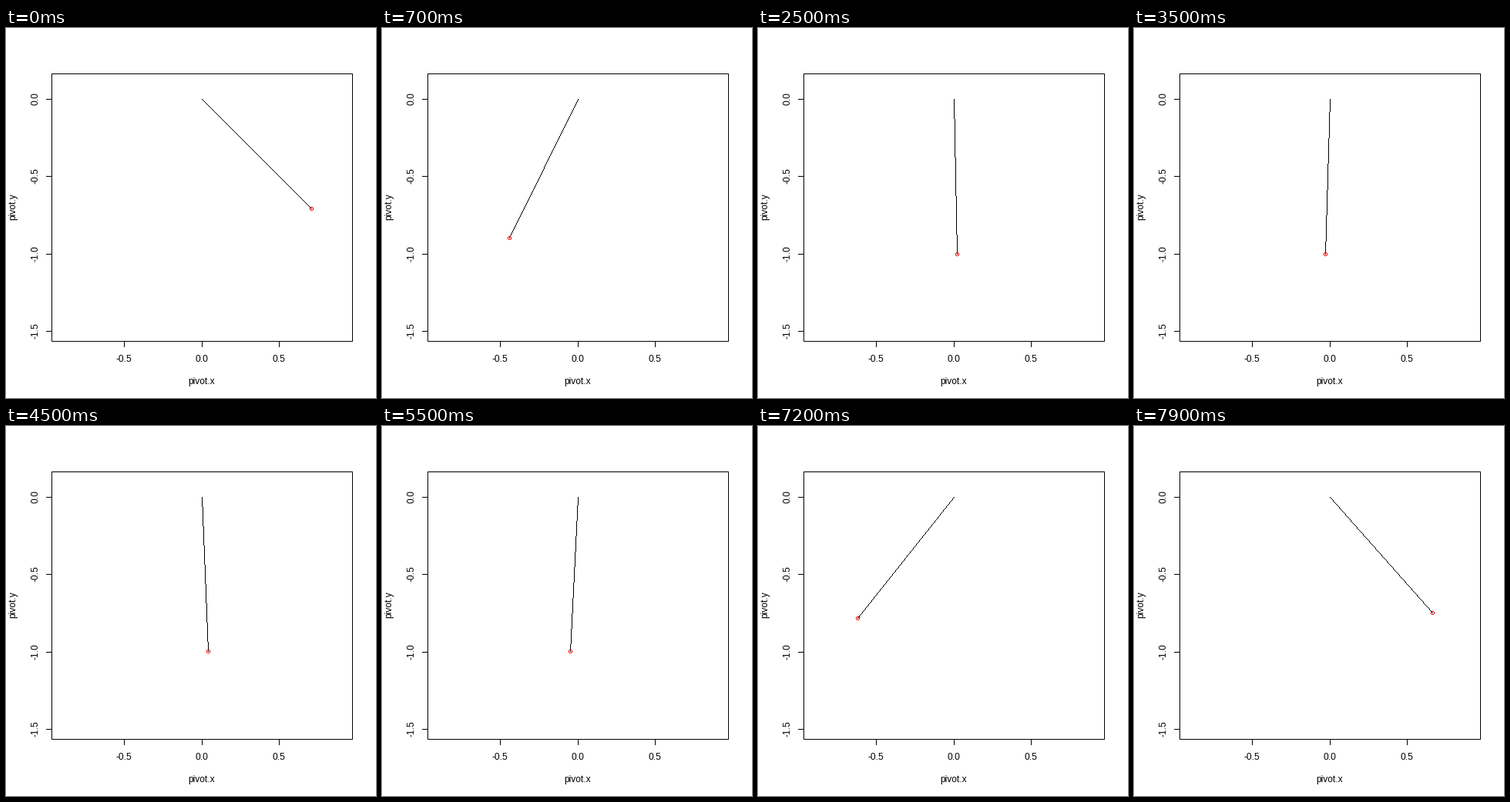
These frames come from a looping animation (480x480 px, 8 s). A matplotlib script:

```python
import numpy as np
import matplotlib.pyplot as plt
from matplotlib.animation import FuncAnimation
from matplotlib.collections import PolyCollection

SIZE, DPI = 480, 100
FRAMES, STEP = 80, 100                 # count, ms
PX = 72 / DPI                          # one pixel in points
LEFT, RIGHT, TOP, BOTTOM = 59, 449, 59, 406
SCALE = 347.52 / 1.728                 # pixels per data unit
OMEGA = np.sqrt(9.8)

plt.rcParams["font.family"] = "Liberation Sans"


def pixel(x, y):
    """Column and row of the pixel that holds a data point."""
    return np.floor([254.4 + x * SCALE, 232.8 - (y + 0.7) * SCALE])


fig = plt.figure(figsize=(SIZE / DPI, SIZE / DPI), dpi=DPI, facecolor="white")
ax = fig.add_axes([0, 0, 1, 1])
ax.set_xlim(0, SIZE)
ax.set_ylim(SIZE, 0)
ax.axis("off")


def stroke(xs, ys):
    """One-pixel line through pixel centres."""
    ax.plot(np.add(xs, 0.5), np.add(ys, 0.5), color="black", lw=PX,
            snap=False, solid_capstyle="projecting", solid_joinstyle="miter")


def label(x, y, text, rotation=0):
    ax.text(x, y, text, fontsize=12 * PX, color="black", ha="center",
            va="baseline", rotation=rotation, rotation_mode="anchor")


def cells(color, zorder):
    group = PolyCollection([], facecolors=color, linewidths=0, zorder=zorder)
    ax.add_collection(group, autolim=False)
    return group


def squares(points):
    """Unit squares for an array of pixel positions."""
    corners = np.array([(0, 0), (1, 0), (1, 1), (0, 1)])
    return points[:, None, :] + corners


def raster_line(p, q):
    """Pixels of a thin line without smoothing."""
    n = int(np.abs(q - p).max())
    return np.floor(np.linspace(p, q, n + 1) + 0.5)


stroke([LEFT, RIGHT, RIGHT, LEFT, LEFT], [TOP, TOP, BOTTOM, BOTTOM, TOP])

for v in (-0.5, 0.0, 0.5):
    x = pixel(v, 0)[0]
    stroke([x, x], [BOTTOM, BOTTOM + 7])
    label(x - 0.5, 433, f"{v:.1f}")
for v in (0.0, -0.5, -1.0, -1.5):
    y = pixel(0, v)[1]
    stroke([LEFT - 7, LEFT], [y, y])
    label(41.5, y - 0.5, f"{v:.1f}", 90)

label(253.5, 462, "pivot.x")
label(12.5, 231.5, "pivot.y", 90)

# Ring of radius two: every pixel whose rounded distance is 2
grid = np.array([(i, j) for i in range(-2, 3) for j in range(-2, 3)])
ring = grid[np.round(np.hypot(*grid.T)) == 2]

rod = cells("black", 3)
bob = cells("red", 4)
pivot = pixel(0, 0)


def update(i):
    theta = np.pi / 4 * np.cos(OMEGA * i * STEP / 1000)
    tip = pixel(np.sin(theta), -np.cos(theta))
    rod.set_verts(squares(raster_line(pivot, tip)))
    bob.set_verts(squares(ring + tip))
    return rod, bob


anim = FuncAnimation(fig, update, frames=FRAMES, interval=STEP,
                     repeat=True, repeat_delay=0)
plt.show()
```
